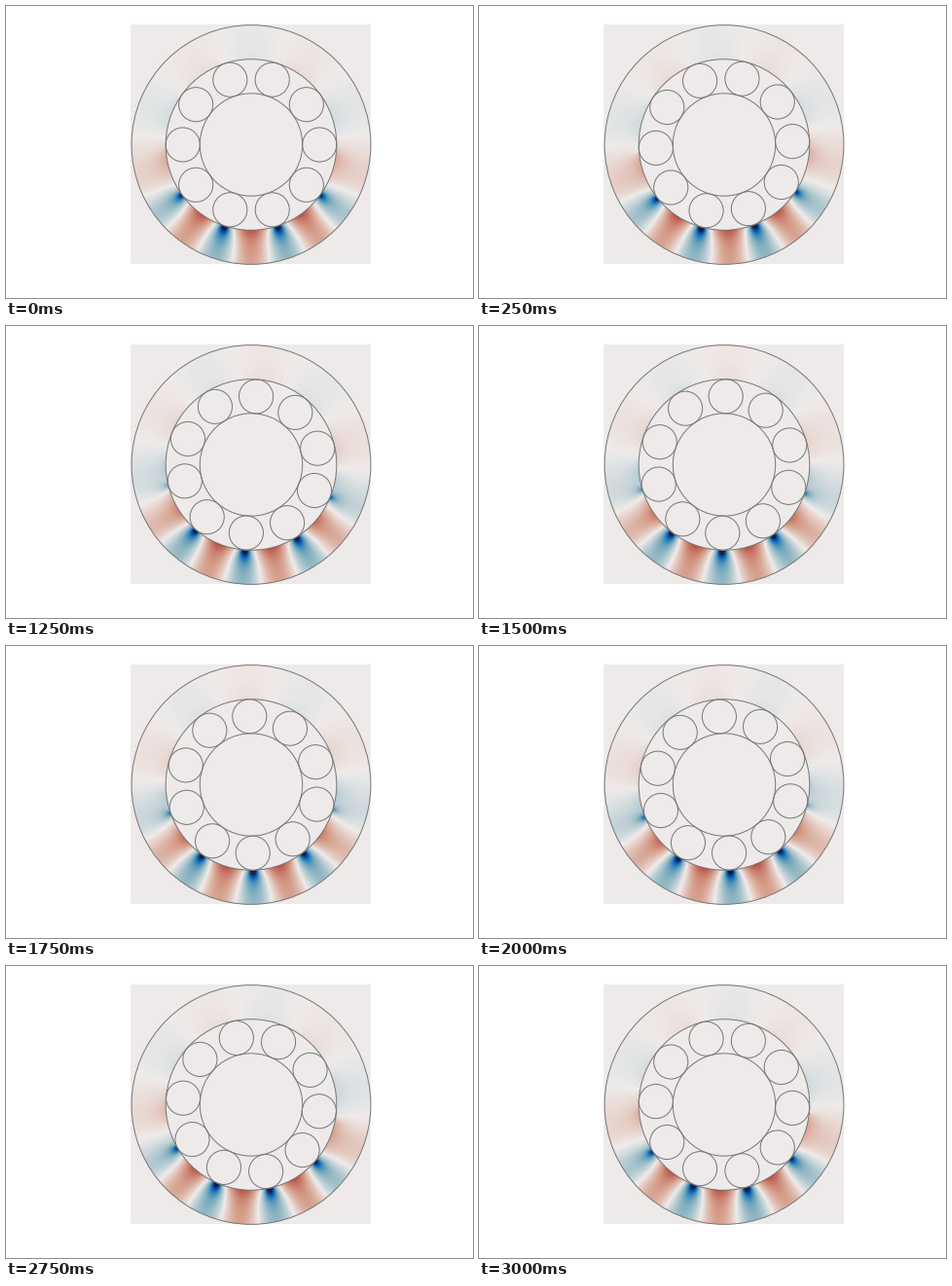
These frames come from a looping animation (480x300 px, 3250 ms). A matplotlib script:

```python
import numpy as np
import matplotlib.pyplot as plt
from matplotlib.animation import FuncAnimation
from matplotlib.colors import LinearSegmentedColormap
from matplotlib.patches import Circle

W, H, DPI = 480, 300, 100
FRAMES, INTERVAL = 13, 250
BALLS = 10
CX, CY, U = 252.0, 142.5, 17.56      # bearing centre and ball radius in px
X0, X1, Y0, Y1 = 128, 375, 19, 265   # field area in px
R_SHAFT, R_PITCH, R_IN, R_OUT = 3, 4, 5, 7

cmap = LinearSegmentedColormap.from_list("stress", [
    (0.00, "#171c42"), (0.18, "#0b66bd"), (0.27, "#4590b9"), (0.36, "#8eb5c2"),
    (0.50, "#efebea"), (0.64, "#d59d89"), (0.82, "#ac2b24"), (1.00, "#3c0911"),
], N=512)

# polar grid, angle measured from straight down, positive to the right
px, py = np.meshgrid(np.arange(X0, X1) + 0.5, np.arange(Y0, Y1) + 0.5)
dx, dy = (px - CX) / U, (py - CY) / U
r, theta = np.hypot(dx, dy), np.arctan2(dx, dy)
ring = (r >= R_IN) & (r <= R_OUT)
depth = np.clip(r - R_IN, 0, R_OUT - R_IN)
deg = np.abs(np.degrees(theta))

# the wave has the ball spacing in the loaded zone and stretches above it
SLOW, SOFT = 4.7, 5.0
knee = 180 - 540 / SLOW
stretched = BALLS * deg - SLOW * SOFT * np.log1p(np.exp((deg - knee) / SOFT))
phase = np.sign(theta) * np.radians(stretched)

envelope = 0.06 + 0.94 / (1 + (deg / 65) ** 5)
wave = envelope * (0.25 + 0.47 * np.exp(-1.7 * depth))
load = 0.3 * np.clip(np.cos(theta), 0, None)
q = 0.75 * np.exp(-1.2 * depth)


def stress(turn):
    """Ring stress with the cage turned by the given angle."""
    c = np.cos(BALLS * (theta - turn) - np.pi)
    # contact peak: Poisson kernel without its first harmonic
    peak = (1 - q**2) / (1 - 2 * q * c + q**2) - 1 - 2 * q * c
    v = -wave * np.cos(phase - BALLS * turn - np.pi) - load * peak
    return np.where(ring, np.clip(v, -1, 1), 0)


def ball_pos(k, turn):
    a = turn + 2 * np.pi * (k + 0.5) / BALLS
    return CX + R_PITCH * U * np.sin(a), CY + R_PITCH * U * np.cos(a)


fig = plt.figure(figsize=(W / DPI, H / DPI), dpi=DPI, facecolor="white")
ax = fig.add_axes([0, 0, 1, 1])
ax.axis("off")
image = ax.imshow(stress(0), cmap=cmap, vmin=-1, vmax=1,
                  extent=(X0, X1, Y1, Y0), interpolation="nearest")
ax.set(xlim=(0, W), ylim=(H, 0), aspect="auto")


def outline(center, radius):
    return ax.add_patch(Circle(center, radius * U, fill=False,
                               ec="0.47", lw=0.72))


for radius in (R_SHAFT, R_IN, R_OUT):
    outline((CX, CY), radius)
balls = [outline(ball_pos(k, 0), 1) for k in range(BALLS)]


def update(i):
    turn = 2 * np.pi / BALLS * i / FRAMES
    image.set_data(stress(turn))
    for k, ball in enumerate(balls):
        ball.center = ball_pos(k, turn)
    return [image, *balls]


anim = FuncAnimation(fig, update, frames=FRAMES, interval=INTERVAL,
                     repeat=True, repeat_delay=0, blit=False)
plt.show()
```
